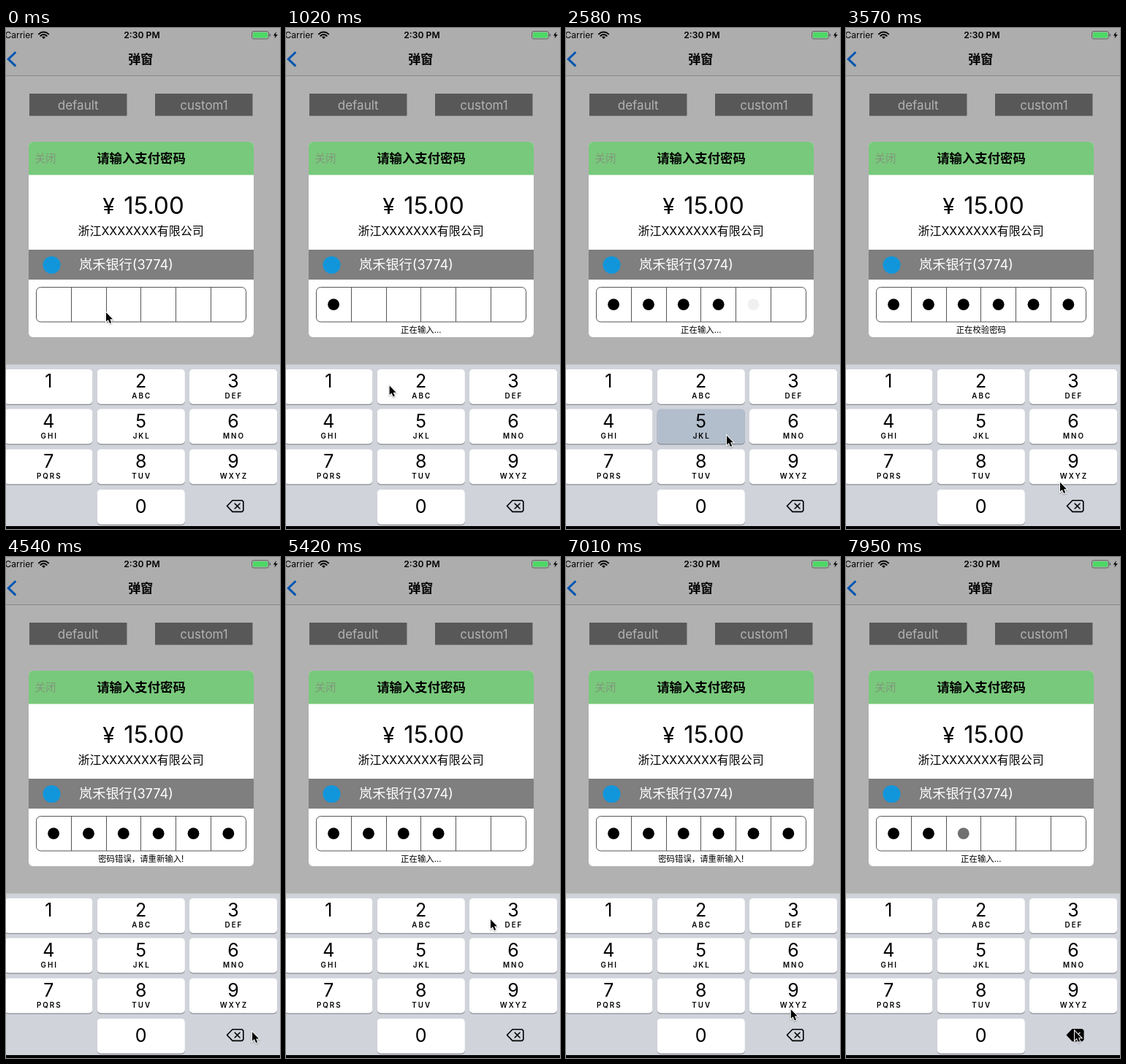
An HTML page with a canvas for the animation above (8000 ms loop, 375 by 687 pixels).

```html
<!DOCTYPE html>
<html lang="zh-CN">
<head>
<meta charset="utf-8">
<title>弹窗</title>
<style>
html, body { margin: 0; width: 100%; height: 100%; overflow: hidden; background: #b1b1b1; }
canvas { display: block; width: 375px; height: 687px; }
</style>
</head>
<body>
<canvas id="stage"></canvas>
<script>
const W = 375, H = 687, LOOP = 8000, FADE = 250;
const FONT = 'Inter, "Noto Sans CJK SC", "Noto Sans CJK", sans-serif';
const PAD = '#d0d3da';
const canvas = document.getElementById('stage');
const ctx = canvas.getContext('2d');
const dpr = window.devicePixelRatio || 1;
canvas.width = W * dpr;
canvas.height = H * dpr;

// pointer: time, x, y
const path = [
  [480, 137, 390], [700, 84, 492], [850, 84, 492], [1100, 160, 490],
  [1330, 160, 490], [1600, 174, 540], [1770, 174, 540], [2000, 190, 596],
  [2230, 190, 596], [2480, 220, 559], [2620, 220, 559], [2820, 272, 545],
  [3270, 272, 545], [3570, 293, 623], [3860, 293, 623], [3920, 302, 625],
  [4060, 302, 625], [4180, 300, 609], [4650, 343, 658], [5070, 343, 658],
  [5360, 280, 497], [6400, 280, 497], [7130, 310, 630], [7160, 310, 630],
  [7300, 313, 650]
];

// key, press time, release time
const taps = [
  ['1', 720, 830], ['2', 1150, 1310], ['5', 1645, 1730], ['8', 2010, 2230],
  ['5', 2565, 2650], ['6', 2820, 3060], ['6', 3230, 3290],
  ['del', 4830, 4910], ['del', 5000, 5070],
  ['3', 5480, 5560], ['3', 5690, 5780],
  ['del', 7470, 7530], ['del', 7580, 7640], ['del', 7700, 7770], ['del', 7840, 8000]
];

const TYPING = '正在输入...', CHECKING = '正在校验密码', WRONG = '密码错误，请重新输入!';
const hints = [
  [0, ''], [720, TYPING], [2860, CHECKING], [3860, WRONG],
  [4830, TYPING], [5700, CHECKING], [6370, WRONG], [7470, TYPING]
];

const letters = ['', 'ABC', 'DEF', 'GHI', 'JKL', 'MNO', 'PQRS', 'TUV', 'WXYZ'];
const colX = [-1.7, 124.7, 251], rowY = [468, 522.5, 577.7, 633];

function text(str, x, y, size, color, weight = 400, align = 'center', spacing = 0) {
  ctx.font = `${weight} ${size}px ${FONT}`;
  ctx.letterSpacing = spacing + 'px';
  ctx.textAlign = align;
  ctx.fillStyle = color;
  ctx.fillText(str, x + spacing / 2, y);
}

function rect(x, y, w, h, color) {
  ctx.fillStyle = color;
  ctx.fillRect(x, y, w, h);
}

function round(x, y, w, h, r, color) {
  ctx.beginPath();
  ctx.roundRect(x, y, w, h, r);
  ctx.fillStyle = color;
  ctx.fill();
}

function disc(x, y, r, color) {
  ctx.beginPath();
  ctx.arc(x, y, r, 0, Math.PI * 2);
  ctx.fillStyle = color;
  ctx.fill();
}

function poly(points, closed) {
  ctx.beginPath();
  points.forEach(([x, y]) => ctx.lineTo(x, y));
  if (closed) ctx.closePath();
}

function stroke(color, width) {
  ctx.strokeStyle = color;
  ctx.lineWidth = width;
  ctx.stroke();
}

function drawStatus() {
  text('Carrier', -1.5, 14.2, 12, '#000', 400, 'left');
  text('2:30 PM', 186, 14.3, 12.2, '#000', 600);

  const cx = 51.5, cy = 15, a = Math.PI / 4;
  ctx.beginPath();
  ctx.moveTo(cx, cy);
  ctx.arc(cx, cy, 3.4, -a * 3, -a);
  ctx.fillStyle = '#000';
  ctx.fill();
  for (const r of [5.9, 9.4]) {
    ctx.beginPath();
    ctx.arc(cx, cy, r, -a * 3, -a);
    stroke('#000', 2);
  }

  ctx.beginPath();
  ctx.roundRect(336.5, 4.5, 23, 10.5, 2.5);
  stroke('#5f6660', 1);
  round(338, 6, 20, 7.5, 1.2, '#4cd964');
  round(360.6, 7.8, 1.5, 4, 0.8, '#5f6660');
  poly([[370, 5], [365.8, 10.4], [368.6, 10.4], [367.4, 14.6], [371.8, 9], [369, 9]], true);
  ctx.fillStyle = '#000';
  ctx.fill();
}

function drawPage() {
  rect(0, 0, W, H, '#b1b1b1');
  rect(0, 0, W, 65, '#adadad');
  rect(0, 65, W, 1, '#888');
  drawStatus();
  text('弹窗', 184.2, 49, 17, '#000', 600);
  ctx.lineCap = 'butt';
  ctx.lineJoin = 'miter';
  poly([[13.3, 33], [3.2, 42.7], [13.3, 52.4]]);
  stroke('#0055b2', 3);
  ['default', 'custom1'].forEach((label, i) => {
    rect(32 + i * 172, 90, 133.5, 30.5, '#585858');
    text(label, 98.7 + i * 172.3, 111.7, 17, '#b3b3b3');
  });
}

function drawDialog(t) {
  round(31, 156, 308, 268, 6, '#fff');
  round(31, 156, 308, 45.5, [6, 6, 0, 0], '#78c97b');
  text('关闭', 39.5, 184.2, 14.4, '#82947f', 400, 'left');
  text('请输入支付密码', 185, 185, 17.4, '#000', 600);
  text('¥', 140.5, 254.5, 30, '#000');
  text('15.00', 202.5, 255, 33, '#000');
  text('浙江XXXXXXX有限公司', 184.6, 284.2, 16, '#000');
  rect(31, 304, 308, 41, '#7f7f7f');
  disc(62.5, 325, 12, '#1296db');
  text('岚禾银行(3774)', 100, 331.3, 18.2, '#fff', 400, 'left');

  ctx.beginPath();
  ctx.roundRect(41.5, 355.5, 287, 47.5, 6);
  for (let i = 1; i < 6; i++) {
    const x = Math.floor(41.5 + i * 47.83) + 0.5;
    ctx.moveTo(x, 355.5);
    ctx.lineTo(x, 403);
  }
  stroke('#555', 1);

  dotLevels(t).forEach((level, i) => {
    if (level > 0) disc(65.1 + i * 47.85, 379.2, 7.9, `rgba(0,0,0,${level})`);
  });
  const hint = hints.filter(h => h[0] <= t).pop()[1];
  text(hint, 184.8, 417.7, 11.4, '#000');
}

function dotLevels(t) {
  const levels = [0, 0, 0, 0, 0, 0];
  let count = 0;
  for (const [key, start] of taps) {
    if (start > t) break;
    const k = Math.min(1, (t - start) / FADE);
    if (key === 'del') levels[--count] = 1 - k;
    else if (count < 6) levels[count++] = k;
  }
  return levels;
}

function drawKey(col, row, digit, label, pressed) {
  const x = colX[col], y = rowY[row], mid = x + 60;
  round(x, y + 1, 120.2, 48, 5, '#898c92');
  round(x, y, 120.2, 47.8, 5, pressed ? '#b2becc' : '#fff');
  text(digit, mid, row === 3 ? 665 : y + 25.3, 25, '#000');
  if (label) text(label, mid, y + 40, 9.8, '#000', 600, 'center', 2);
}

function drawDelete(pressed) {
  ctx.lineJoin = 'round';
  ctx.lineCap = 'round';
  poly([[302.5, 655.5], [310, 647.8], [323, 647.8], [324.8, 649.6],
    [324.8, 661.6], [323, 663.4], [310, 663.4]], true);
  if (pressed) {
    ctx.fillStyle = '#000';
    ctx.fill();
  }
  stroke('#000', 1.6);
  ctx.beginPath();
  for (const s of [-1, 1]) {
    ctx.moveTo(313.2, 655.6 - 3.4 * s);
    ctx.lineTo(320, 655.6 + 3.4 * s);
  }
  stroke(pressed ? PAD : '#000', 1.6);
}

function drawKeypad(t) {
  const tap = taps.find(p => p[1] <= t && t < p[2]);
  const held = tap ? tap[0] : '';
  rect(0, 461.5, W, 222, PAD);
  letters.forEach((label, i) => {
    const digit = String(i + 1);
    drawKey(i % 3, Math.floor(i / 3), digit, label, held === digit);
  });
  drawKey(1, 3, '0', '', false);
  drawDelete(held === 'del');
  rect(0, 683, W, 4, '#000');
}

function pointerAt(t) {
  const i = path.findIndex(p => p[0] > t);
  if (i === 0) return path[0].slice(1);
  if (i < 0) return path[path.length - 1].slice(1);
  const a = path[i - 1], b = path[i];
  const u = (t - a[0]) / (b[0] - a[0]);
  const e = u * u * (3 - 2 * u);
  return [a[1] + (b[1] - a[1]) * e, a[2] + (b[2] - a[2]) * e];
}

function drawPointer(t) {
  const [x, y] = pointerAt(t);
  ctx.save();
  ctx.translate(x, y);
  ctx.lineJoin = 'miter';
  poly([[0, 0], [0, 12.6], [2.9, 9.9], [5.1, 15], [7.2, 14.1], [5.1, 9.2], [9, 9.2]], true);
  ctx.shadowColor = 'rgba(0,0,0,.3)';
  ctx.shadowBlur = 2 * dpr;
  ctx.shadowOffsetY = dpr;
  stroke('#fff', 2);
  ctx.shadowColor = 'transparent';
  ctx.fillStyle = '#000';
  ctx.fill();
  ctx.restore();
}

function draw(now) {
  const t = now % LOOP;
  ctx.setTransform(dpr, 0, 0, dpr, 0, 0);
  drawPage();
  drawDialog(t);
  drawKeypad(t);
  drawPointer(t);
}

let origin;
function tick(now) {
  origin ??= now;
  draw(now - origin);
  requestAnimationFrame(tick);
}
draw(0);
requestAnimationFrame(tick);
</script>
</body>
</html>
```
